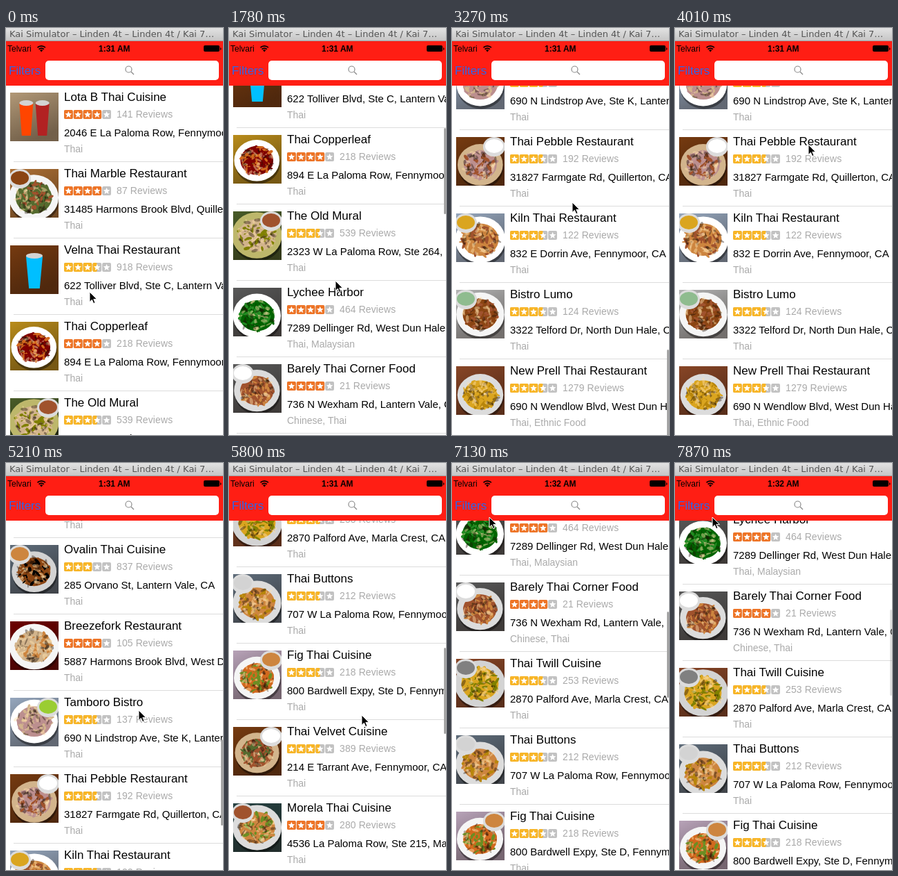
Write an HTML page with a canvas that moves like this. It is 314x586 px and loops after 8000 ms.

```html
<!DOCTYPE html>
<html lang="en">
<head>
<meta charset="utf-8">
<title>Restaurant list</title>
<style>
html, body { margin: 0; width: 100%; height: 100%; overflow: hidden; background: #fff; }
#stage { position: relative; width: 314px; height: 586px; overflow: hidden; background: #fff;
  font-family: "Liberation Sans", Arial, sans-serif; color: #000; }
#stage * { box-sizing: border-box; }
#stage span, #stage svg, #list canvas { position: absolute; white-space: nowrap; line-height: 20px; }
#title { position: absolute; inset: 0 0 auto; height: 19px; overflow: hidden;
  background: linear-gradient(#e2e2e2, #c6c6c6); border-bottom: 1px solid #a0a0a0; }
#title span { left: 5px; top: 1px; font: 13px "DejaVu Sans", sans-serif; color: #555; }
#nav { position: absolute; left: 0; top: 19px; width: 314px; height: 64px; background: #ff1e14; }
#nav .net { left: 2px; top: 1px; font-size: 12px; }
#clock { left: 134px; top: 1px; font-size: 12px; font-weight: bold; }
#nav .filters { left: 4px; top: 33px; font-size: 17px; color: #2b66ea; }
#field { position: absolute; left: 57px; top: 28px; width: 251px; height: 28px; border-radius: 5px; background: #fff; }
#nav svg { left: 0; top: 0; }
#list { position: absolute; left: 0; top: 83px; width: 314px; }
.row { position: relative; height: 110px; overflow: hidden; }
.row::after { content: ""; position: absolute; left: 11px; right: 0; bottom: 0; height: 1px; background: #dcdcdc; }
.row canvas { left: 6px; top: 10px; }
.row span { left: 84px; }
.row .name { top: 7px; font-size: 17px; }
.row svg { left: 84px; top: 35px; }
.row .count { left: 160px; top: 31px; font-size: 14px; letter-spacing: .1px; color: #aaa; }
.row .addr { top: 58px; font-size: 15px; }
.row .kind { top: 81px; font-size: 14px; color: #aaa; }
#bar { position: absolute; left: 311px; top: 84px; width: 3px; height: 124px; border-radius: 2px; background: #a4a4a4; }
#cursor { left: -1px; top: -1px; }
</style>
</head>
<body>
<div id="stage">
  <div id="list"></div>
  <div id="bar"></div>
  <div id="nav">
    <span class="net">Telvari</span>
    <span id="clock">1:31 AM</span>
    <span class="filters">Filters</span>
    <div id="field"></div>
    <svg width="314" height="64" fill="none">
      <path d="M45.500 9.200a8 8 0 0 1 11.400 0M47.600 11.600a5 5 0 0 1 7.200 0" stroke="#000" stroke-width="1.700"/>
      <path d="M51.200 15.400l-2.100-2.300a3 3 0 0 1 4.200 0z" fill="#000"/>
      <rect x="286" y="6" width="23" height="9" rx="2" fill="#000"/>
      <path d="M310 9v4q1.500-.5 1.500-2t-1.500-2" fill="#000"/>
      <path d="M181 44l4 4" stroke="#8a8a8a" stroke-width="1.200"/>
      <circle cx="177.500" cy="40.500" r="4.500" stroke="#8a8a8a" stroke-width="1.200"/>
    </svg>
  </div>
  <div id="title"><span>Kai Simulator – Linden 4t – Linden 4t / Kai 7…</span></div>
  <svg id="cursor" width="14" height="20"><path d="M1 1v14.500l3.400-3.200 2.300 5.300 2.400-1-2.300-5.200h4.700z" fill="#000" stroke="#fff"/></svg>
</div>
<script>
const $ = id => document.getElementById(id);

// name | stars | reviews | address | picture colours | category
// picture: table, plate, two foods, side dish; or table, "glass", drinks
const places = `Lota B Thai Cuisine|4|141|2046 E La Paloma Row, Fennymoor, CA|tan glass orangered firebrick
Thai Marble Restaurant|4|87|31485 Harmons Brook Blvd, Quillerton, CA|peru whitesmoke darkolivegreen sienna saddlebrown
Velna Thai Restaurant|3.5|918|622 Tolliver Blvd, Ste C, Lantern Vale, CA|saddlebrown glass deepskyblue
Thai Copperleaf|4|218|894 E La Paloma Row, Fennymoor, CA|goldenrod white maroon chocolate
The Old Mural|3.5|539|2323 W La Paloma Row, Ste 264, Fennymoor|darkolivegreen darkkhaki tan olive sienna
Lychee Harbor|4|464|7289 Dellinger Rd, West Dun Hale, CA|dimgray white darkgreen forestgreen|Thai, Malaysian
Barely Thai Corner Food|4|21|736 N Wexham Rd, Lantern Vale, CA|dimgray gainsboro sienna peru white|Chinese, Thai
Thai Twill Cuisine|3.5|253|2870 Palford Ave, Marla Crest, CA|sienna lightgray goldenrod olive gray
Thai Buttons|3.5|212|707 W La Paloma Row, Fennymoor, CA|slategray gainsboro peru darkgoldenrod lightgray
Fig Thai Cuisine|3.5|218|800 Bardwell Expy, Ste D, Fennymoor, CA|thistle whitesmoke chocolate olivedrab peru
Thai Velvet Cuisine|3.5|389|214 E Tarrant Ave, Fennymoor, CA|saddlebrown tan sienna darkolivegreen white
Morela Thai Cuisine|4|280|4536 La Paloma Row, Ste 215, Marla Crest|darkslategray gainsboro peru olivedrab sienna
Reed Lane Thai Cuisine|4|773|3820 Harmons Brook Blvd, Ste 230, Quillerton|darkslategray antiquewhite goldenrod peru gray
Ovalin Thai Cuisine|3|837|285 Orvano St, Lantern Vale, CA|slategray lightgray saddlebrown black peru
Breezefork Restaurant|4|105|5887 Harmons Brook Blvd, West Dun Hale|maroon whitesmoke tan peru
Tamboro Bistro|3.5|137|690 N Lindstrop Ave, Ste K, Lantern Vale|lightsteelblue white rosybrown tan yellowgreen
Thai Pebble Restaurant|3.5|192|31827 Farmgate Rd, Quillerton, CA|saddlebrown tan rosybrown sienna white
Kiln Thai Restaurant|3.5|122|832 E Dorrin Ave, Fennymoor, CA|lightsteelblue white peru sienna goldenrod
Bistro Lumo|3.5|124|3322 Telford Dr, North Dun Hale, CA|lightgray whitesmoke saddlebrown sienna darkseagreen
New Prell Thai Restaurant|3.5|1279|690 N Wendlow Blvd, West Dun Hale, CA|sienna gainsboro goldenrod darkgoldenrod|Thai, Ethnic Food`
  .split("\n").map(line => line.split("|"));

function random(seed) {
  return () => (seed = (seed * 16807) % 2147483647) / 2147483647;
}

function photo(look, i) {
  const canvas = document.createElement("canvas");
  canvas.width = canvas.height = 70;
  const c = canvas.getContext("2d"), rnd = random(971 * (i + 3));
  const between = (a, b) => a + (b - a) * rnd();
  const oval = (x, y, rx, ry, color, turn = 0) => {
    c.fillStyle = color;
    c.beginPath();
    c.ellipse(x, y, rx, ry, turn, 0, 7);
    c.fill();
  };
  const shade = c.createLinearGradient(0, 0, 30, 70);
  shade.addColorStop(0, "rgba(0,0,0,.15)");
  shade.addColorStop(1, "rgba(20,12,8,.5)");
  const [table, plate, ...colors] = look.split(" ");
  for (const fill of [table, shade]) {
    c.fillStyle = fill;
    c.fillRect(0, 0, 70, 70);
  }
  c.filter = "blur(.5px)";

  if (plate === "glass") {
    colors.forEach((drink, n) => {
      const x = 70 * (n + 1) / (colors.length + 1), w = 14 - 2 * colors.length;
      c.fillStyle = drink;
      c.beginPath();
      c.moveTo(x - w, 16);
      c.lineTo(x + w, 16);
      c.lineTo(x + w * .65, 62);
      c.lineTo(x - w * .65, 62);
      c.fill();
      oval(x, 15, w, 4, "lightgray");
    });
  } else {
    const [foodA, foodB, side] = colors;
    const x = between(34, 40), y = between(34, 42), r = between(29, 34);
    oval(x + 1, y + 4, r + 3, r, "rgba(0,0,0,.4)");
    oval(x, y, r + 3, r, plate);
    oval(x, y, r * .8, r * .7, foodA);
    const tones = [foodA, foodB, "rgba(255,225,170,.45)", "rgba(30,15,5,.4)"];
    for (let n = 0; n < 120; n++) {
      const a = between(0, 2 * Math.PI), d = Math.sqrt(rnd()) * r * .8;
      oval(x + Math.cos(a) * d, y + Math.sin(a) * d * .85,
        between(2, 6), between(1, 2.5), tones[n % 4], between(0, Math.PI));
    }
    if (side) {
      const left = rnd() < .5 ? 14 : 55;
      oval(left, 14, 16, 14, "gainsboro");
      oval(left, 13, 13, 10, side);
    }
  }
  return canvas;
}

function stars(score) {
  const color = score >= 4 ? "#ee7426" : "#f8b526";
  let out = "";
  for (let n = 0; n < 5; n++) {
    const x = n * 13.8, fill = Math.max(0, Math.min(1, score - n));
    let pts = "";
    for (let p = 0; p < 10; p++) {
      const a = p * Math.PI / 5, r = p % 2 ? 2.3 : 5.1;
      pts += `${x + 6.4 + r * Math.sin(a)},${6.8 - r * Math.cos(a)} `;
    }
    out += `<rect x="${x}" width="12.8" height="13" rx="2" fill="#c2c2c2"/>` +
      `<rect x="${x}" width="${12.8 * fill}" height="13" rx="2" fill="${color}"/>` +
      `<polygon points="${pts}" fill="#fff"/>`;
  }
  return `<svg width="70" height="13">${out}</svg>`;
}

places.forEach(([name, score, count, addr, look, kind = "Thai"], i) => {
  const row = document.createElement("div");
  row.className = "row";
  row.innerHTML = `<span class="name">${name}</span>${stars(+score)}` +
    `<span class="count">${count} Reviews</span><span class="addr">${addr}</span><span class="kind">${kind}</span>`;
  row.prepend(photo(look, i));
  $("list").append(row);
});

// The screen updates in ticks; each hand move is [from tick, to tick, x, y].
const LOOP = 8000, TICK = 148.6, END = 1696;
const moves = [[0, 3, 125, 255], [5, 9, 150, 508], [11, 13, 155, 333], [15, 18, 174, 251],
  [22, 27, 193, 168], [29, 31, 193, 324], [34, 36, 192, 363], [40, 44, 63, 86], [44, 46, 54, 78]];

function hand(k) {
  let x = 121, y = 380;
  for (const [from, to, tx, ty] of moves) {
    const f = Math.max(0, Math.min(1, (k - from) / (to - from)));
    const ease = 1 - (1 - f) ** 2.5;
    x += (tx - x) * ease;
    y += (ty - y) * ease;
  }
  return [x, y];
}

// A released flick slows down by friction.
const glide = (from, to, ticks) => to + (from - to) * Math.exp(-ticks * TICK / 487);

// The list follows the hand while dragged and glides after each flick.
function scroll(k, y) {
  if (k > 34) return glide(813, 565, k - 39);
  if (k > 28) return END + 168 - y;
  if (k > 15) return Math.min(END, glide(300, 1997, k - 15));
  if (k > 10) return 125 + 508 - y;
  return k > 4 ? 125 : 380 - y;
}

// The scroll bar fades over three ticks after each spell of scrolling.
function barAlpha(k) {
  const spells = [[1, 5], [12, 23], [30, 51]];
  const last = spells.filter(([from]) => k >= from).pop();
  return last ? Math.max(0, Math.min(1, 1 - (k - last[1]) / 3)) : 0;
}

function draw(now) {
  const k = Math.min(53, Math.floor((now % LOOP + 6) / TICK));
  const [x, y] = hand(k).map(Math.round);
  const top = Math.round(scroll(k, y));
  $("list").style.transform = `translateY(${-top}px)`;
  $("bar").style.transform = `translateY(${Math.round(top * .2235)}px)`;
  $("bar").style.opacity = barAlpha(k);
  $("cursor").style.transform = `translate(${x}px, ${y}px)`;
  $("clock").textContent = k < 47 ? "1:31 AM" : "1:32 AM";
}

const start = performance.now();
(function loop() {
  draw(performance.now() - start);
  requestAnimationFrame(loop);
})();
</script>
</body>
</html>
```
